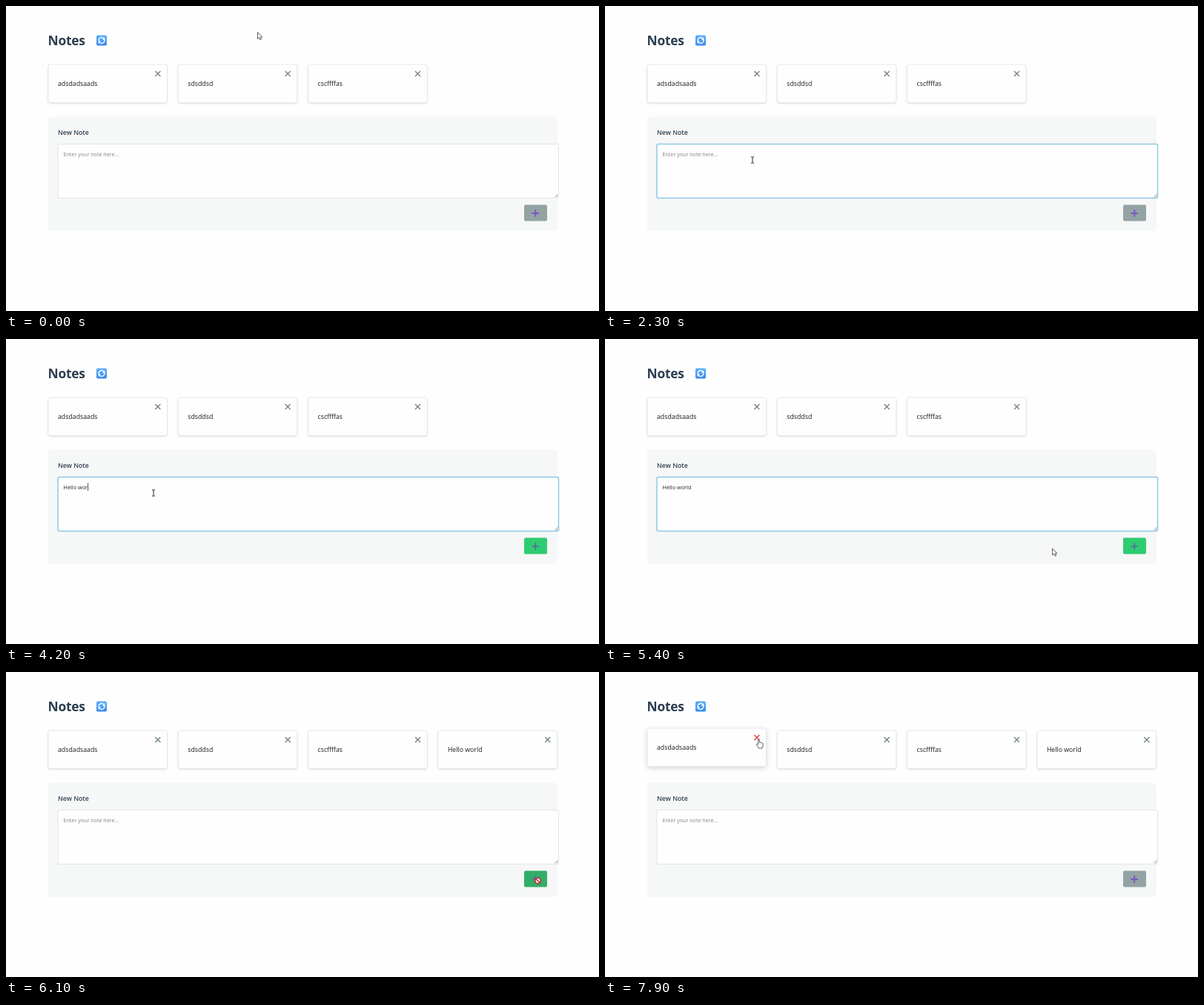
An HTML page that plays this animation: 800x412 px, repeating every 8 s.

```html
<!DOCTYPE html>
<html lang="en">
<head>
<meta charset="utf-8">
<title>Notes</title>
<style>
  html, body { margin: 0; width: 100%; height: 100%; overflow: hidden; background: #fefefe; }
  svg { display: block; width: 100vw; height: 100vh; }
  text { font-family: "Open Sans", "Noto Sans", sans-serif; white-space: pre; }
  .title { font-size: 17.4px; font-weight: 700; letter-spacing: -.25px; fill: #2c3e50; }
  .label { font-size: 8.75px; font-weight: 600; fill: #2c3e50; }
  .note { font-size: 8.75px; fill: #1c1c1c; }
  .hint { font-size: 7.15px; fill: #838383; }
  .typed { font-size: 7.32px; fill: #222; }
  .cross { fill: none; stroke-width: 1.35; }
  .outline { fill: #fff; stroke: #333; stroke-width: .8; stroke-linejoin: round; }
</style>
</head>
<body>
<svg viewBox="0 0 800 412">
  <defs>
    <linearGradient id="blue" x2="0" y2="1">
      <stop offset="0" stop-color="#5cb0fb"/>
      <stop offset="1" stop-color="#3789ef"/>
    </linearGradient>
  </defs>
  <rect width="800" height="412" fill="#fefefe"/>
  <text class="title" x="56.5" y="52.5">Notes</text>
  <g transform="translate(129 46.5)">
    <rect x="-7" y="-7" width="14" height="14" rx="2" fill="url(#blue)"/>
    <g fill="none" stroke="#fff" stroke-width="1.3">
      <path d="M-3.8 1.2A4 4 0 0 1 2.8-2.8M3.8-1.2A4 4 0 0 1-2.8 2.8"/>
    </g>
    <path d="M4.3-4.4V-.8H.7ZM-4.3 4.4V.8H-.7Z" fill="#fff"/>
  </g>
  <g id="cards"></g>
  <rect x="56.5" y="149.5" width="687.5" height="154.5" rx="5" fill="#f6f7f7"/>
  <text class="label" x="70" y="173.5">New Note</text>
  <rect id="box" x="70" y="186.5" width="675.5" height="73" rx="2" fill="#fefefe"/>
  <path d="M740.5 258.3L744.5 254.3M743 258.3L744.5 256.8" stroke="#666" stroke-width=".7"/>
  <text id="hint" class="hint" x="77.5" y="202.6">Enter your note here...</text>
  <text id="typed" class="typed" x="77.5" y="202.6"></text>
  <path id="caret" d="M0 194.5V205" stroke="#222" stroke-width=".8"/>
  <rect id="button" x="699" y="268.5" width="31" height="22" rx="2"/>
  <path id="plus" d="M709.4 280H719M714.2 275.2V284.8"/>
  <g id="arrow">
    <path class="outline" d="M0 0V9L2 7.2L3.4 10.2L4.9 9.5L3.6 6.6H6.2Z"/>
  </g>
  <g id="beam" fill="none" stroke="#222" stroke-width="1">
    <path d="M-2-4H-.5L0-3.6L.5-4H2M0-3.6V3.6M-2 4H-.5L0 3.6L.5 4H2"/>
  </g>
  <g id="hand">
    <path class="outline" d="M-.9 7V.8Q-.9 0 0 0T.9.8V4.2Q2.2 3.5 2.6 4.5Q3.8 3.9 4.2 5Q5.6 4.6 5.6 6V8.5Q5.6 10 4.4 12H-.2Q-1 10.3-2.9 7.7Q-3.4 6.4-2.3 6.1Z"/>
  </g>
  <g id="stop" stroke="#c81f30" stroke-width="1.6">
    <circle r="3.8" fill="#fff"/>
    <path d="M-2.7-2.7L2.7 2.7"/>
  </g>
</svg>
<script>
const LOOP = 8000, STEP = 100;
const $ = id => document.getElementById(id);
const set = (el, attrs) => { for (const k in attrs) el.setAttribute(k, attrs[k]); };
const show = (el, on) => el.setAttribute("visibility", on ? "visible" : "hidden");
const mix = (a, b, p) => `rgb(${a.map((v, i) => Math.round(v + (b[i] - v) * p))})`;
const ramp = (t, from, to) => Math.min(1, Math.max(0, (t - from) / (to - from)));
const ease = p => p * p * (3 - 2 * p);

const GRAY = [147, 163, 164], GREEN = [46, 204, 113], DARK_GREEN = [39, 174, 96];
const PURPLE = [125, 87, 194], DIM_PURPLE = [92, 102, 158];
const CROSS = [114, 130, 131], RED = [222, 62, 50];

// time, pointer shape, x, y
const pointer = [
  [0, "arrow", 339.5, 35.5],
  [500, "arrow", 337, 52], [600, "arrow", 322, 104], [700, "arrow", 304, 133.5],
  [900, "arrow", 262, 162], [1000, "beam", 212, 196], [1100, "beam", 199, 208],
  [5300, "beam", 405, 251], [5400, "arrow", 603.7, 283], [5500, "arrow", 668, 298],
  [5600, "hand", 706, 281], [5700, "hand", 712, 279], [5800, "hand", 714, 278],
  [6000, "stop", 717.5, 282],
  [6600, "arrow", 690, 270], [6700, "beam", 606, 232], [6800, "beam", 505, 193],
  [6900, "arrow", 420, 163], [7000, "arrow", 355.5, 147], [7100, "arrow", 308, 141],
  [7200, "arrow", 263, 135], [7300, "arrow", 229, 127], [7400, "arrow", 216, 119],
  [7500, "arrow", 213, 107], [7600, "arrow", 210, 98], [7700, "hand", 208, 92.5],
  [7800, "hand", 207.5, 91]
];
// time, letters typed so far
const keys = [[0, 0], [2500, 1], [3000, 2], [3100, 3], [3300, 5], [3500, 6], [3700, 7],
  [3900, 8], [4200, 9], [4400, 10], [4600, 11], [6000, 0]];
const caretOn = [[1700, 2300], [2400, 5100], [5600, 5800]];
const latest = (list, t) => list.filter(e => e[0] <= t).pop();

const cards = ["adsdadsaads", "sdsddsd", "cscffffas", "Hello world"].map((note, i) => {
  const g = document.createElementNS("http://www.w3.org/2000/svg", "g");
  g.innerHTML = `
    <rect x="57" y="79" width="160.5" height="51.5" rx="3" fill="#fefefe" stroke="#e2e6e8" stroke-width=".8"/>
    <text class="note" x="70" y="108">${note}</text>
    <path class="cross" d="M201.4 88L208.4 95M208.4 88L201.4 95"/>`;
  $("cards").append(g);
  return { g, x: i * 175.3, rect: g.querySelector("rect"), cross: g.querySelector("path") };
});

function drawCard(card, lift, hot) {
  set(card.g, { transform: `translate(${card.x} ${-3 * lift})` });
  card.rect.style.filter =
    `drop-shadow(0 ${1 + lift}px ${1 + 2 * lift}px rgba(0,0,0,${0.13 + 0.03 * lift}))`;
  set(card.cross, { stroke: mix(CROSS, RED, hot) });
}

function drawButton(t) {
  const live = t < 6000 ? ease(ramp(t, 2400, 2700)) : 1 - ease(ramp(t, 6050, 6300));
  const over = t >= 5600;
  set($("button"), { fill: mix(GRAY, over ? DARK_GREEN : GREEN, live) });
  set($("plus"), { stroke: mix(PURPLE, DIM_PURPLE, live), "stroke-width": 2.1 - 0.4 * live });
}

function drawField(t) {
  const focus = t >= 1700 && t < 5800;
  const typed = "Hello world".slice(0, latest(keys, t)[1]);
  set($("box"), { stroke: focus ? "#8ec8e6" : "#dfe3e5", "stroke-width": focus ? 1.5 : 0.9 });
  $("typed").textContent = typed;
  show($("hint"), !typed);
  show($("caret"), caretOn.some(([a, b]) => t >= a && t < b));
  const end = typed ? $("typed").getComputedTextLength() : 0;
  set($("caret"), { transform: `translate(${78 + end} 0)` });
}

function drawPointer(t) {
  const [, shape, x, y] = latest(pointer, t);
  for (const id of ["arrow", "beam", "hand", "stop"]) show($(id), id === shape);
  set($(shape), { transform: `translate(${x} ${y})` });
}

function draw(ms) {
  const t = Math.floor((ms % LOOP) / STEP) * STEP;
  cards.forEach((card, i) => drawCard(card,
    i ? 0 : ease(ramp(t, 7400, 7700)),
    i ? 0 : ease(ramp(t, 7600, 7900))));
  show(cards[3].g, t >= 6000);
  drawField(t);
  drawButton(t);
  drawPointer(t);
}

const start = performance.now();
function tick() {
  draw(performance.now() - start);
  requestAnimationFrame(tick);
}
tick();
</script>
</body>
</html>
```
